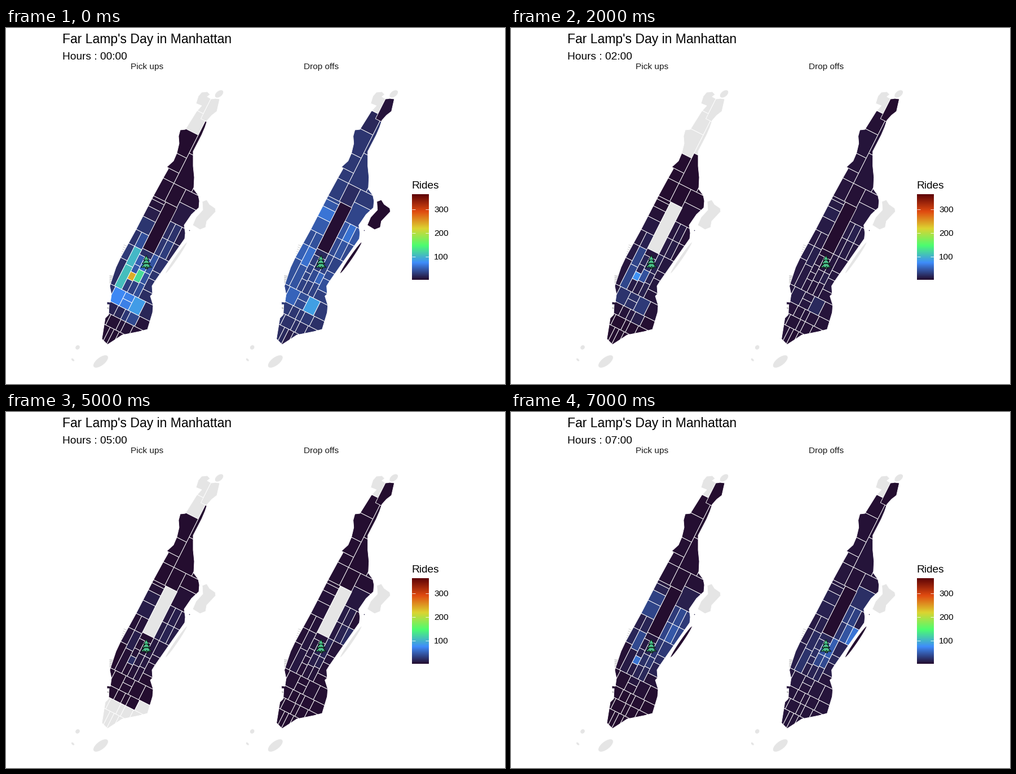
Animation of 885x632 px, one loop 8000 ms. Source, as a matplotlib script:

```python
import numpy as np
import matplotlib.pyplot as plt
from matplotlib.animation import FuncAnimation
from matplotlib.collections import PolyCollection
from matplotlib.colors import LinearSegmentedColormap

W, H, DPI = 885, 632, 100
PX = 72 / DPI              # one pixel in points
SHIFT = 309.7              # distance between the two maps
MAX_RIDES = 361
MIN_RIDES = 0.45           # expected counts below this show as no rides
NO_RIDES = (0.898, 0.898, 0.898, 1)
FAR = 400
RAMP = LinearSegmentedColormap.from_list(
    "rides", ["#240d2f", "#3f8cfb", "#4cfd70", "#dcd431", "#e04a10", "#5e0306"], 1024)

# Street grid: first axis runs north along the avenues, second runs east.
ORIGIN = np.array([242, 391])
AXES = np.array([[0.45, 0.893], [-0.893, 0.45]])

plt.rcParams["font.family"] = "Liberation Sans"
fig = plt.figure(figsize=(W / DPI, H / DPI), dpi=DPI, facecolor="white")
ax = fig.add_axes([0, 0, 1, 1])


def to_grid(p):
    return (np.asarray(p, float) - ORIGIN) @ AXES


def from_grid(q):
    return ORIGIN + np.asarray(q) @ AXES.T


# --- Geometry: one shoreline cut along avenues and cross streets ---

SHORE = to_grid([
    (347, 138), (337, 134), (341, 121), (347, 114), (357, 113), (362, 118), (357, 122), (364, 126),
    (371, 125), (379, 126), (374, 148), (365, 155), (357, 164), (353, 176), (347, 190), (332, 219),
    (332, 245), (334, 265), (333, 286), (341, 297), (343, 307), (342, 319), (329, 331), (316, 350),
    (318, 364), (317, 374), (289, 414), (264, 450), (259, 458), (260, 472), (256, 476), (261, 492),
    (260, 505), (251, 535), (236, 539), (206, 545), (194, 553), (180, 562), (170, 552), (176, 515),
    (182, 509), (183, 491), (179, 491), (179, 486), (185, 487), (187, 473), (184, 458), (195, 425),
    (203, 408), (231, 357), (262, 297), (280, 264), (288, 250), (285, 247), (297, 236), (303, 222),
    (307, 205), (306, 192), (309, 181), (318, 180), (338, 148)])
shapes = []


def clip(poly, axis, limit, sign):
    """Keep the part of a polygon on one side of a grid line."""
    kept = []
    for p, q in zip(poly, np.roll(poly, -1, axis=0)):
        dp, dq = sign * (p[axis] - limit), sign * (q[axis] - limit)
        if dp >= 0:
            kept.append(p)
        if dp * dq < 0:
            kept.append(p + (q - p) * dp / (dp - dq))
    return np.array(kept).reshape(-1, 2)


def area(p):
    x, y = p.T
    return abs(x @ np.roll(y, -1) - y @ np.roll(x, -1)) / 2


def blocks(avenues, streets):
    """Add every cell between neighbouring avenues (west to east) and streets (north to south)."""
    for west, east in zip(avenues, avenues[1:]):
        for north, south in zip(streets, streets[1:]):
            cell = SHORE
            for cut in ((1, west, 1), (1, east, -1), (0, south, 1), (0, north, -1)):
                cell = clip(cell, *cut)
            if len(cell) > 2 and area(cell) > 6:
                shapes.append(from_grid(cell))


def blob(x, y, length, width, dx, dy):
    """Add an oval island with its long axis along (dx, dy)."""
    a = np.linspace(0, 2 * np.pi, 24, endpoint=False)
    d = np.array([dx, dy]) / np.hypot(dx, dy)
    along, across = length * np.cos(a), width * np.sin(a)
    shapes.append(np.column_stack([x + along * d[0] - across * d[1],
                                   y + along * d[1] + across * d[0]]))


# Uptown
blocks([-FAR, -2], [262, 224, 178, 148, 128, 92])
blocks([-2, FAR], [252, 188])
blocks([-2, 33], [188, 128])
blocks([33, FAR], [188, 128])
blocks([-2, 22], [128, 92])
blocks([22, FAR], [128, 103, 65])
blocks([-FAR, -11], [FAR, 262])
blocks([-11, FAR], [FAR, 252])
# West side, park and east side
blocks([-FAR, 0], [92, 86, 72, 51.5, 25])
blocks([0, 22.7], [92, 0, -12])
blocks([22.7, 33.3, 46, FAR], [65, 33, 0])
# Midtown
blocks([-FAR, -14], [25, -3, -32, -82])
blocks([-14, 0], [25, -3, -38, -82])
blocks([0, 11], [-12, -31, -46, -60, -82])
blocks([11, 22.7], [-12, -36, -58, -82])
blocks([22.7, 33.3], [0, -36, -56, -82])
blocks([33.3, FAR], [0, -27, -42, -64, -82])
# Downtown
blocks([-FAR, -12, 9], [-82, -110])
blocks([9, 27], [-82, -95, -110])
blocks([27, 48, FAR], [-82, -110])
blocks([-FAR, 8, 22, 32, 50, FAR], [-110, -130])
blocks([-FAR, 3, 23, 32, 48, FAR], [-130, -151])
blocks([-FAR, 12, 20, 30, FAR], [-151, -FAR])
# Islands
blob(378, 117, 9, 5.5, 5, -4)
blob(302, 408, 34, 2.8, 39, -57)
blob(168, 592, 16, 7.5, 13, -10)
blob(127, 567, 4.5, 4, 1, -1)
blob(118.5, 589, 3.6, 2.2, 1, 1)
shapes.append(np.array([(348, 308), (356, 305), (361, 313), (371, 320), (372, 326), (356, 343), (354, 354),
                        (344, 358), (331, 350), (337, 336), (349, 323)]))

centers = np.array([s.mean(axis=0) for s in shapes])


# --- Demand: a base level by latitude plus a few busy and quiet spots ---

def bump(x, y, along, across):
    d = to_grid(centers) - to_grid((x, y))
    return np.exp(-((d[:, 0] / along) ** 2 + (d[:, 1] / across) ** 2) / 2)


def demand(base, spots):
    total = np.interp(centers[:, 1], *zip(*base), left=0, right=0)
    for x, y, peak, along, across in spots:
        total = total + peak * bump(x, y, along, across)
    for x, y, depth, along, across in QUIET:
        total = total * (1 - depth * bump(x, y, along, across))
    return np.where(centers[:, 1] < 562, total, 0)


QUIET = [(272, 355, 0.93, 45, 7), (352, 331, 0.96, 14, 14), (302, 408, 0.95, 14, 4)]

night_out = demand([(150, 0), (310, 2.6), (480, 4), (530, 2.3), (550, 2.3), (556, 0)], [
    (217, 422, 115, 28, 7), (221, 440, 240, 6, 5), (235, 440, 105, 8, 5), (205, 480, 90, 11, 10),
    (231, 498, 72, 15, 11), (246, 413, 60, 10, 9), (285, 385, 26, 35, 12), (243, 360, 20, 25, 11),
    (240, 455, 30, 30, 14)])
night_home = demand([(128, 0), (140, 3), (165, 17), (200, 24), (400, 32), (480, 28), (545, 18), (558, 0)], [
    (258, 335, 32, 18, 9), (298, 368, 28, 20, 10), (220, 410, 30, 25, 9),
    (231, 493, 60, 10, 9), (248, 447, 22, 10, 10), (201, 475, 25, 9, 9)])
early_out = demand([(130, 0), (140, 0.65), (205, 1.8), (280, 3), (440, 3), (490, 1.3), (550, 1.3), (556, 0)], [
    (290, 385, 42, 32, 16), (252, 343, 36, 20, 11), (221, 440, 55, 6, 5),
    (225, 402, 35, 15, 7), (242, 445, 20, 25, 15)])
early_home = demand([(128, 0), (140, 1.2), (180, 3), (300, 6), (550, 5), (558, 0)], [
    (294, 398, 60, 9, 8), (300, 352, 34, 22, 9), (251, 422, 50, 26, 11),
    (213, 428, 20, 25, 8), (255, 350, 10, 25, 10)])


def pickups(hour):
    return night_out * max(0, 1 - hour / 6) ** 2.8 + early_out * (hour / 7) ** 3.5


def dropoffs(hour):
    return night_home * np.exp(-0.8 * hour) + early_home * (hour / 7) ** 3.5


def shade(rides):
    return RAMP(max(0, (rides - 1) / (MAX_RIDES - 1)))


def fill(rides):
    return shade(rides) if rides >= MIN_RIDES else NO_RIDES


# --- Drawing ---

def draw_piers(dx):
    for i in range(6):
        y = 385 + 3.8 * i
        ax.plot([209 - i + dx, 216 - 1.8 * i + dx], [y, y + 3], color="0.72", lw=0.7 * PX)
    for y in range(440, 455, 3):
        ax.plot([184 + dx, 190 + dx], [y, y + 1], color="0.55", lw=0.8 * PX)
    ax.plot([180 + dx, 185 + dx], [497, 498], color="0.4", lw=PX)
    ax.plot([325 + dx], [358.5], "o", ms=1.6 * PX, color="#332a55", mec="none")


def draw_tree(cx):
    """Small decorated fir made of three tiers and a trunk."""
    line = dict(ec="black", lw=0.9 * PX, zorder=5)
    ax.fill(cx + np.array([-2, 2, 2, -2]), [423, 423, 427, 427], fc="#3f7f5f", **line)
    for i in range(3):
        top, half = 415 - 5.5 * i, 9.5 - 2.35 * i
        ax.fill([cx, cx + half, cx - half], [top, top + 10 - i, top + 10 - i], fc="#4cc38c", **line)
    for i in range(6):
        ax.plot([cx + (i % 3 - 1) * (5 - 2 * (i // 3))], [422.5 - 6 * (i // 3)], "o",
                ms=2 * PX, color="#10251d", mec="none", zorder=6)
    ax.plot([cx], [404], "*", ms=4 * PX, color="#15352a", mec="none", zorder=6)


def label(x, y, text, size, ha="left", color="black"):
    return ax.text(x, y, text, fontsize=size * PX, ha=ha, va="baseline", color=color)


def draw_legend():
    label(719.5, 285, "Rides", 19.2)
    top, bottom = 296, 447.5
    ramp = np.array([[shade(v)] for v in np.linspace(MAX_RIDES, 1, 300)])
    ax.imshow(ramp, extent=(719.5, 749.5, bottom, top), aspect="auto", interpolation="bilinear")
    for rides in (100, 200, 300):
        y = bottom - (rides - 1) / (MAX_RIDES - 1) * (bottom - top)
        for x in (719.5, 743.5):
            ax.plot([x, x + 6], [y, y], color="white", lw=0.8 * PX, solid_capstyle="butt")
        label(759, y + 5.5, str(rides), 15.36)


maps = []
for dx, name, rides in ((0, "Pick ups", pickups), (SHIFT, "Drop offs", dropoffs)):
    draw_piers(dx)
    coll = PolyCollection([s + [dx, 0] for s in shapes], edgecolors="white",
                          linewidths=0.9 * PX, zorder=3)
    ax.add_collection(coll)
    maps.append((coll, rides))
    draw_tree(248.8 + dx)
    label(249.6 + dx, 72.5, name, 15.36, "center", "0.1")

draw_legend()
label(99.5, 26.5, "Far Lamp's Day in Manhattan", 23.04)
clock = label(99.5, 55.5, "", 19.2)
ax.set_xlim(0, W)
ax.set_ylim(H, 0)
ax.axis("off")


def update(hour):
    for coll, rides in maps:
        coll.set_facecolor([fill(r) for r in rides(hour)])
    clock.set_text(f"Hours : {hour:02d}:00")
    return [coll for coll, _ in maps] + [clock]


anim = FuncAnimation(fig, update, frames=8, interval=1000, repeat=True, repeat_delay=0)
plt.show()
```
